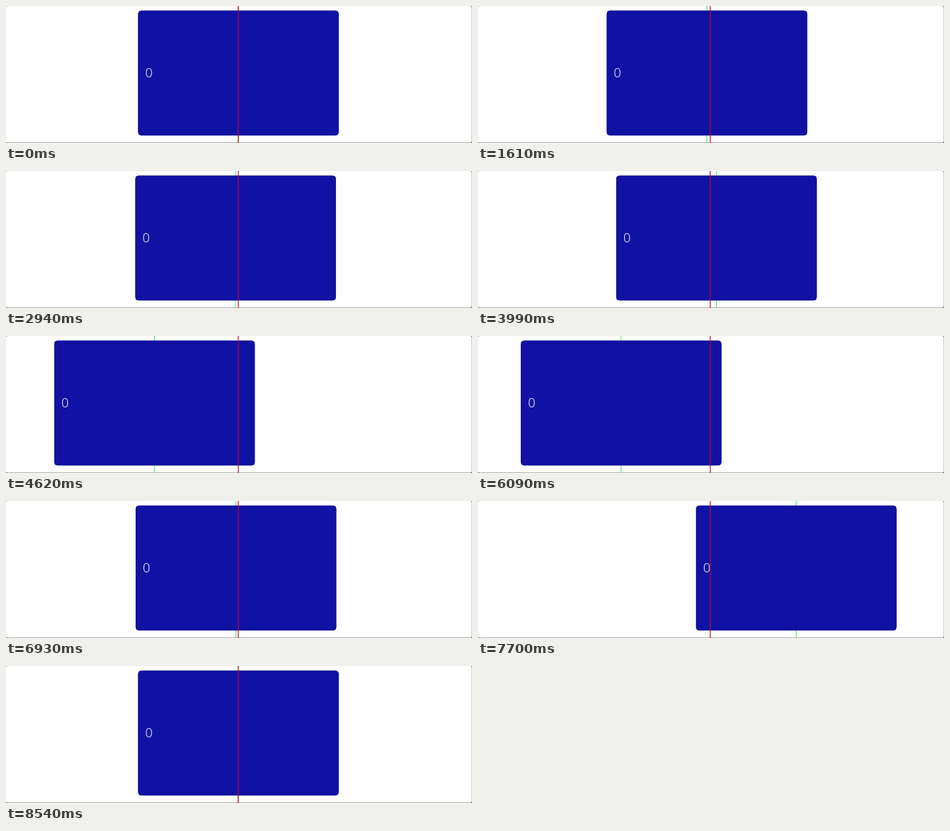
Animation, 654 px wide and 194 px high, one loop 9520 ms. Source, as an HTML page:

```html
<!DOCTYPE html>
<html lang="en">
<head>
<meta charset="utf-8">
<title>Snapping card</title>
<style>
  html, body { margin: 0; width: 100%; height: 100%; overflow: hidden; background: #666; }
  svg { display: block; }
  text { font: 300 18px "Open Sans", Lato, sans-serif; fill: #fff; }
  path { stroke-width: 1.2; }
</style>
</head>
<body>
<svg width="654" height="194" viewBox="0 0 654 194">
  <rect width="653.7" height="193.4" rx="2" fill="#fff"/>
  <g id="card">
    <path d="M326 0V194" stroke="#5ce878"/>
    <rect x="185.8" y="6.9" width="280.7" height="176" rx="4" fill="#1012a3" stroke="#08098a"/>
    <text x="195.4" y="101">0</text>
  </g>
  <path d="M326 0V194" stroke="#c0052c"/>
</svg>
<script>
const LOOP = 9520, STEP = 70, HOLD = 140, RETURN = 665;

const swipes = [
  { start: 770, release: 1225, reach: -32 },
  { start: 1960, release: 2485, reach: -90 },
  { start: 3150, release: 3605, reach: 90 },
  { start: 4200, release: 4935, reach: -137 },
  { start: 5670, release: 6475, reach: -157 },
  { start: 7175, release: 7875, reach: 122 }
];

// Part still to go, from 1 at the start to 0 at the end
function remaining(time, start, end, power) {
  const progress = Math.min(1, Math.max(0, (time - start) / (end - start)));
  return (1 - progress) ** power;
}

// Drag out, hold, then snap back; longer drags snap harder
function swipeOffset({ start, release, reach }, time) {
  const dragged = 1 - remaining(time, start, release - HOLD, 1.6);
  const snapPower = 1.9 + Math.abs(reach) / 110;
  return reach * dragged * remaining(time, release, release + RETURN, snapPower);
}

const card = document.getElementById("card");
const begin = performance.now();

function draw() {
  const elapsed = (performance.now() - begin) % LOOP;
  const time = Math.floor(elapsed / STEP) * STEP;
  const offset = swipes.reduce((sum, swipe) => sum + swipeOffset(swipe, time), 0);
  card.setAttribute("transform", `translate(${offset.toFixed(2)} 0)`);
  requestAnimationFrame(draw);
}
draw();
</script>
</body>
</html>
```
